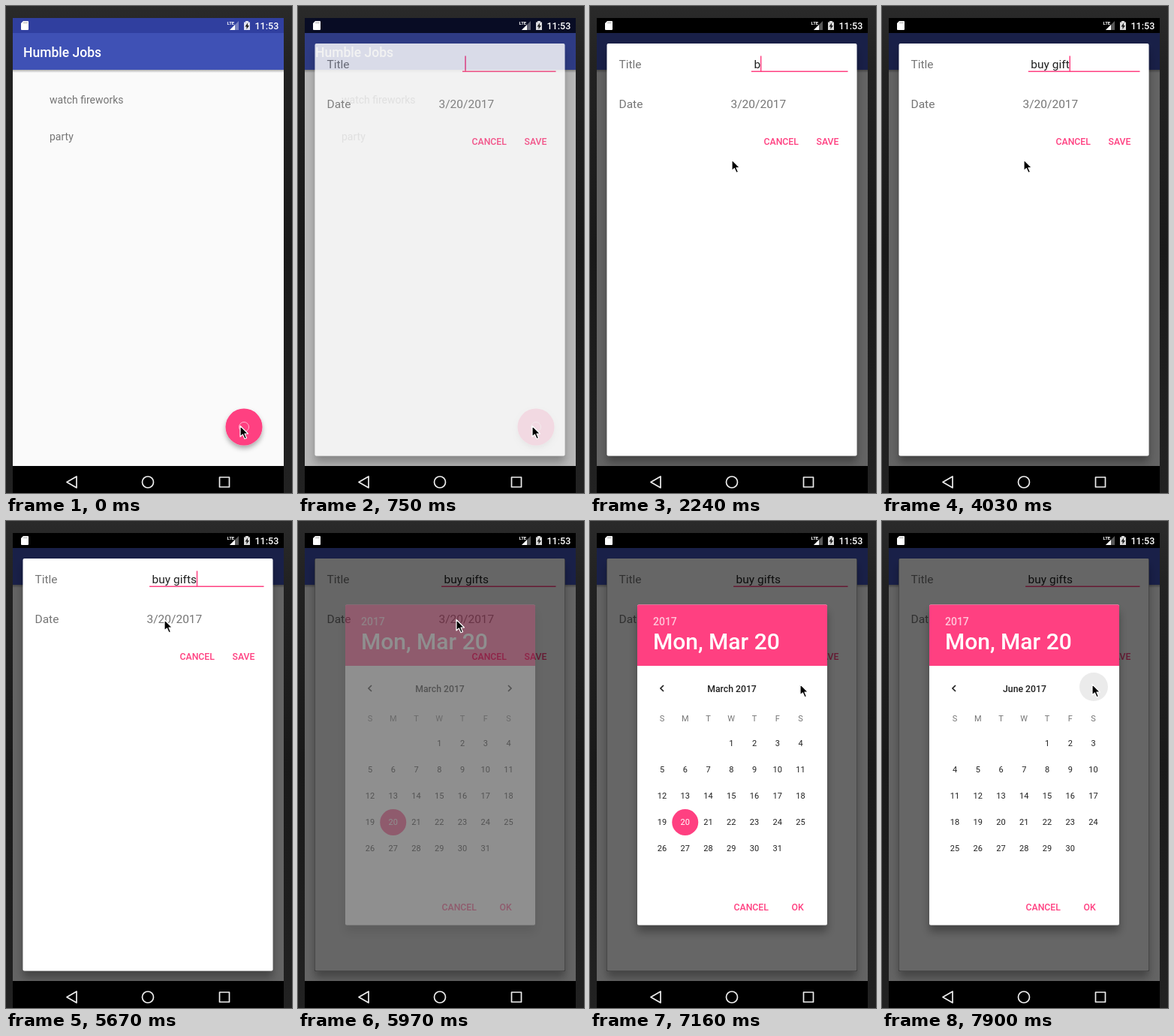
An HTML page for the animation above (8000 ms loop, 381 by 649 pixels).

```html
<!DOCTYPE html>
<html lang="en">
<head>
<meta charset="utf-8">
<title>Todo app</title>
<style>
  html, body { margin: 0; width: 100%; height: 100%; overflow: hidden; background: #1e1e1e; }
  svg { display: block; width: 100vw; height: 100vh; font-family: Roboto, sans-serif; }
  .med { font-weight: 500; }
  .btn { font-weight: 500; font-size: 12.25px; fill: #ff4081; }
  .form { font-size: 15.5px; fill: #757575; }
  .item { font-size: 14px; fill: #757575; }
  .day { font-size: 11px; fill: #212121; text-anchor: middle; }
  .mid { text-anchor: middle; }
</style>
</head>
<body>
<svg viewBox="0 0 381 649" preserveAspectRatio="none">
  <defs>
    <linearGradient id="desk" x2="0" y2="1">
      <stop offset="0" stop-color="#2a2a2a"/>
      <stop offset=".12" stop-color="#222"/>
      <stop offset=".5" stop-color="#191919"/>
      <stop offset="1" stop-color="#222"/>
    </linearGradient>
    <linearGradient id="barShade" x2="0" y2="1">
      <stop offset="0" stop-opacity=".3"/>
      <stop offset="1" stop-opacity="0"/>
    </linearGradient>
    <filter id="lift" x="-20%" y="-20%" width="140%" height="150%">
      <feDropShadow dx="0" dy="9" stdDeviation="6" flood-opacity=".32"/>
    </filter>
    <filter id="fabLift" x="-30%" y="-30%" width="160%" height="170%">
      <feDropShadow dx="0" dy="4" stdDeviation="3" flood-opacity=".32"/>
    </filter>
    <clipPath id="screen"><rect x="9" y="16" width="361" height="597"/></clipPath>
    <clipPath id="pane"><rect x="63" y="193" width="253" height="345"/></clipPath>
  </defs>

  <rect width="381" height="649" fill="url(#desk)"/>
  <g clip-path="url(#screen)">
    <rect x="9" y="85" width="361" height="528" fill="#fafafa"/>
    <rect x="9" y="36" width="361" height="49" fill="#3f51b5"/>
    <rect x="9" y="85" width="361" height="4" fill="url(#barShade)"/>
    <text class="med" x="23" y="67.5" font-size="17.5" fill="#fff">Humble Jobs</text>
    <text class="item" x="58" y="129.5">watch fireworks</text>
    <text class="item" x="58" y="178.5">party</text>
    <circle cx="317" cy="561" r="24.5" fill="#ff4081" filter="url(#fabLift)"/>
    <circle cx="317" cy="561" r="6.5" fill="none" stroke="#fff" stroke-opacity=".6"/>
    <rect id="dim" x="9" y="36" width="361" height="577"/>

    <g id="form">
      <rect x="22.5" y="50" width="333" height="549.5" rx="2" fill="#fff" filter="url(#lift)"/>
      <text class="form" x="38.5" y="83">Title</text>
      <text class="form" x="38.5" y="135.5">Date</text>
      <text class="form" x="187.5" y="135.5">3/20/2017</text>
      <text class="btn" x="231.5" y="184.5">CANCEL</text>
      <text class="btn" x="301.5" y="184.5">SAVE</text>
      <path id="line" stroke="#ff4081" stroke-width="1.5"/>
      <text id="typed" class="form" y="83" style="fill:#212121;white-space:pre"></text>
      <rect id="caret" y="66.5" width="1.5" height="21" fill="#ff4081"/>
    </g>
    <rect id="formDim" x="22" y="50" width="334" height="550" rx="2" opacity=".6"/>

    <g id="picker">
      <rect x="63" y="111.5" width="253" height="427" rx="2" fill="#fff" filter="url(#lift)"/>
      <path d="M63 193V113.500q0-2 2-2H314q2 0 2 2V193z" fill="#ff4081"/>
      <text class="med" x="84" y="139" font-size="14" fill="#fff" fill-opacity=".7">2017</text>
      <text class="med" x="84" y="170.500" font-size="30" fill="#fff">Mon, Mar 20</text>
      <circle id="ripple" cx="282" cy="221" r="19" fill="#ebebeb"/>
      <path d="M98 219l-4 4 4 4M280 219l4 4-4 4" fill="none" stroke="#212121" stroke-width="1.700"/>
      <g clip-path="url(#pane)"><g id="months"></g></g>
      <text class="btn" x="191.500" y="518.500">CANCEL</text>
      <text class="btn" x="268.500" y="518.500">OK</text>
    </g>
  </g>

  <rect id="status" x="9" y="16" width="361" height="20"/>
  <path d="M23 20h6q1 0 1 1v10q0 1-1 1h-8q-1 0-1-1V23z" fill="#fff"/>
  <path d="M24 21v2.500M26 21v2.500M28 21v2.500" stroke="#888" stroke-width=".7"/>
  <path d="M310 20v12h-12z" fill="#fff" fill-opacity=".35"/>
  <path d="M305 25v7h-7z" fill="#fff"/>
  <text x="294.500" y="25" font-size="6" font-weight="700" fill="#fff">LTE</text>
  <path d="M319 20h4v1.500h2V32h-8V21.500h2z" fill="#fff" fill-opacity=".85"/>
  <path d="M322 22.500l-3.500 5h2v3.500l3.500-5h-2z" fill="#222"/>
  <text class="med" x="331.500" y="31" font-size="12.500" fill="#fff">11:53</text>

  <rect x="9" y="613" width="361" height="36"/>
  <g fill="none" stroke="#eee" stroke-width="1.700" stroke-linejoin="round">
    <path d="M81 634.500l13-7.500v15z"/>
    <circle cx="189" cy="634.500" r="7.500"/>
    <rect x="284.500" y="628" width="13" height="13"/>
  </g>
  <path id="mouse" d="M0 0V14.500L3.400 11.400 6 17.300 8.500 16.200 6 10.500H10.500z"
        stroke="#fff" stroke-width="1.200" stroke-linejoin="round"/>
</svg>

<script>
const LOOP = 8000, STEP = 149.2, PAGE = 253;
const TITLE = "buy gifts";
const KEYS = [15, 16, 17, 18, 20, 21, 23, 27, 30];   // step at which each letter lands
const BLINKS = [[8, 11], [26, 27], [33, 36], [40, 99]]; // caret hidden
const MOVES = [
  { from: 6, to: 11, a: [312, 559.5], b: [189, 205] },
  { from: 33, to: 38, a: [189, 205], b: [211, 131.5] },
  { from: 43, to: 48, a: [211, 131.5], b: [280, 217.5] }
];
const SCROLL = [0.6, 1.4, 2.5, 2.996];               // months paged, from step 50

const $ = id => document.getElementById(id);
const set = (id, attrs) => {
  for (const key in attrs) $(id).setAttribute(key, attrs[key]);
};
const show = (id, on) => set(id, { visibility: on ? "inherit" : "hidden" });
const ease = p => {
  p = Math.min(1, Math.max(0, p));
  return p * p * (3 - 2 * p);
};

function monthMarkup(name, month, page) {
  const first = new Date(2017, month, 1).getDay();
  const count = new Date(2017, month + 1, 0).getDate();
  const colX = c => 96 + 30.75 * c;
  let out = `<text class="med mid" x="189" y="227.5" font-size="12.25" fill="#212121">${name} 2017</text>`;
  [..."SMTWTFS"].forEach((d, c) => {
    out += `<text class="day" x="${colX(c)}" y="267" style="fill:#757575">${d}</text>`;
  });
  for (let d = 1; d <= count; d++) {
    const cell = first + d - 1;
    const x = colX(cell % 7), y = 296 + 35 * Math.floor(cell / 7);
    const picked = month === 2 && d === 20;
    if (picked) out += `<circle cx="${x}" cy="${y + .5}" r="17.5" fill="#ff4081"/>`;
    out += `<text class="day" x="${x}" y="${y + 4}"${picked ? ' style="fill:#fff"' : ""}>${d}</text>`;
  }
  return `<g transform="translate(${page * PAGE})">${out}</g>`;
}

$("months").innerHTML = ["March", "April", "May", "June"]
  .map((name, i) => monthMarkup(name, i + 2, i)).join("");

function drawField(k) {
  const typed = $("typed");
  typed.textContent = TITLE.slice(0, KEYS.filter(key => key <= k).length);
  const width = typed.textContent ? typed.getComputedTextLength() : 0;
  const left = 219 - width * 0.47;
  set("typed", { x: left + 3.5 });
  set("line", { d: `M${left} 87.2H343.5` });
  set("caret", { x: left + 3.3 + width });
  show("caret", !BLINKS.some(([a, b]) => k >= a && k < b));
}

function drawMouse(k) {
  const move = MOVES.filter(m => k >= m.from).pop() || MOVES[0];
  const p = ease((k - move.from) / (move.to - move.from));
  const [x, y] = move.a.map((v, i) => v + (move.b[i] - v) * p);
  set("mouse", { transform: `translate(${x} ${y})` });
}

function draw(k) {
  const opening = k === 5;
  set("status", { fill: k < 5 ? "#303f9f" : opening ? "#080c24" : "#000" });
  set("dim", { opacity: k < 5 ? 0 : opening ? 0.27 : 0.6 });
  set("form", { opacity: opening ? 0.82 : 1 });
  show("form", k >= 5);
  show("formDim", k >= 40);
  set("picker", { opacity: k === 40 ? 0.27 : k === 41 ? 0.8 : 1 });
  show("picker", k >= 40);
  show("ripple", k >= 50);
  const paged = k < 50 ? 0 : SCROLL[Math.min(3, k - 50)];
  set("months", { transform: `translate(${-paged * PAGE})` });
  drawField(k);
  drawMouse(k);
}

const start = performance.now();
let last = -1;
function tick() {
  const t = (performance.now() - start) % LOOP;
  const k = Math.floor((t + 8) / STEP);
  if (k !== last) draw(last = k);
  requestAnimationFrame(tick);
}
tick();
</script>
</body>
</html>
```
